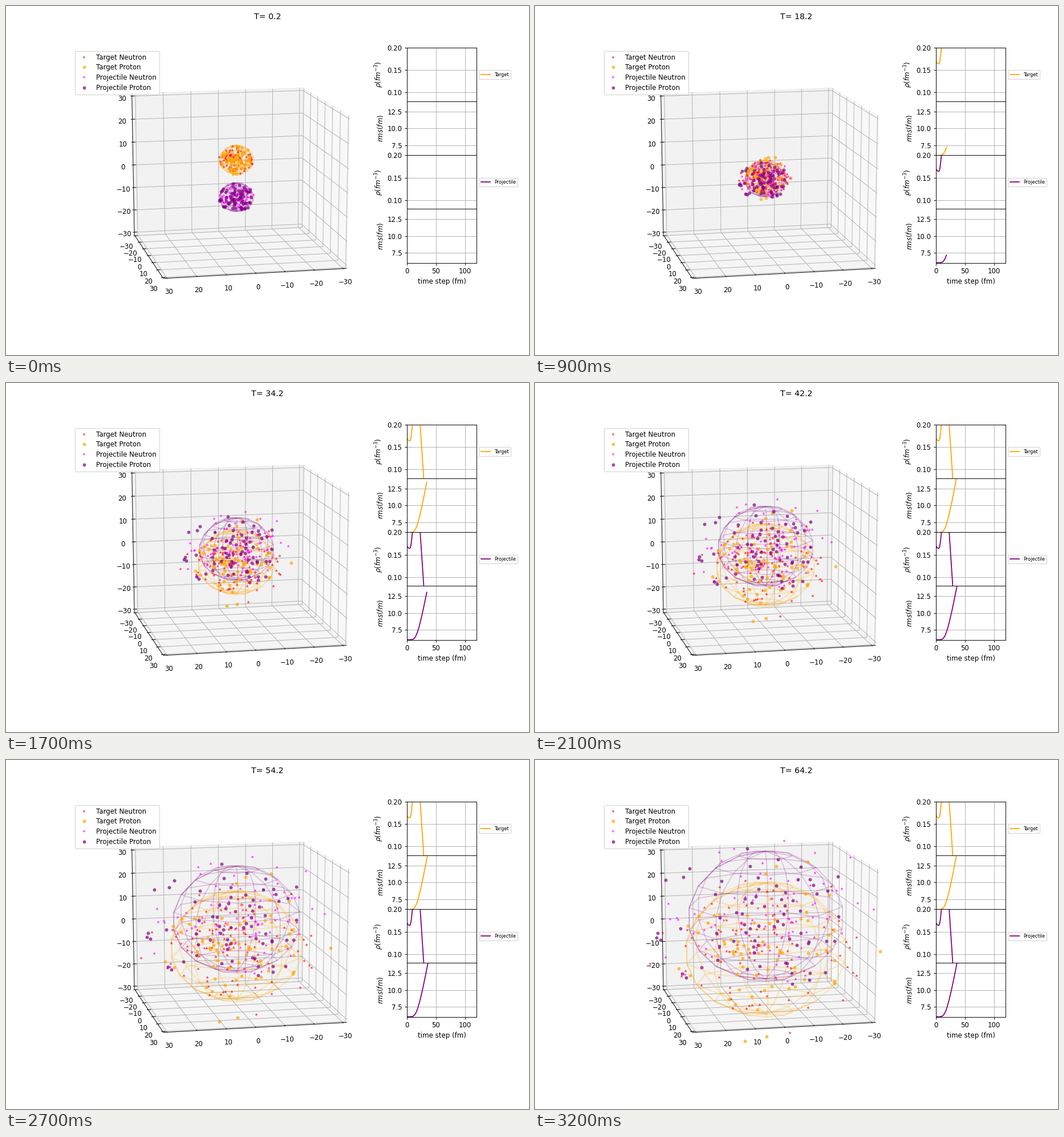
Write a matplotlib script that moves like this. It is 917 px wide and 611 px high and loops after 3300 ms.

```python
import numpy as np
import matplotlib.pyplot as plt
from matplotlib.animation import FuncAnimation
from matplotlib.collections import LineCollection, PolyCollection

W, H = 917, 611
H_FULL = 611.33  # layout height before rounding to whole pixels
FRAMES, STEP, T0 = 33, 2.0, 0.2
PT = 1.1793  # pixels per point

plt.rcParams.update({
    "font.family": "DejaVu Sans", "font.size": 10 * PT,
    "axes.linewidth": 0.8 * PT, "grid.linewidth": 0.8 * PT,
    "lines.linewidth": 1.5 * PT, "patch.linewidth": PT,
    "xtick.major.size": 3.5 * PT, "ytick.major.size": 3.5 * PT,
    "xtick.major.width": 0.8 * PT, "ytick.major.width": 0.8 * PT,
    "xtick.major.pad": 3.5 * PT, "ytick.major.pad": 3.5 * PT,
    "axes.labelpad": 4 * PT,
})

fig = plt.figure(figsize=(W / 72, H / 72), dpi=72, facecolor="white")
title = fig.suptitle("", y=0.98 * H_FULL / H, fontsize=12 * PT)


def add_axes(left, bottom, width, height):
    k = H_FULL / H
    return fig.add_axes([left, bottom * k, width, height * k])


# ---- perspective camera -------------------------------------------------
LEFT, RIGHT = 0.125 * W, 0.7396 * W
TOP, BOTTOM = H - 0.88 * H_FULL, H - 0.11 * H_FULL
SX, SY = (RIGHT - LEFT) / 0.185, (BOTTOM - TOP) / 0.185
CX, CY = LEFT + 0.095 * SX, BOTTOM - 0.095 * SY
AZ, EL = np.radians(78), np.radians(14)
EYE = np.array([np.cos(AZ) * np.cos(EL), np.sin(AZ) * np.cos(EL), np.sin(EL)])
U = np.array([-np.sin(AZ), np.cos(AZ), 0])
V = np.cross(EYE, U)


def project(p):
    p = np.asarray(p, float) / 60
    depth = 10 - p @ EYE
    return np.stack([CX + SX * (p @ U) / depth, CY - SY * (p @ V) / depth], -1)


ax = add_axes(0.125, 0.11, 0.6146, 0.77)
ax.set(xlim=(LEFT, RIGHT), ylim=(BOTTOM, TOP))
ax.axis("off")


def draw_box():
    e, pad = 31.25, 34.4
    panes = [
        ([(-e, -e, -e), (-e, e, -e), (-e, e, e), (-e, -e, e)], 0.95),
        ([(-e, -e, -e), (e, -e, -e), (e, -e, e), (-e, -e, e)], 0.90),
        ([(-e, -e, -e), (e, -e, -e), (e, e, -e), (-e, e, -e)], 0.925),
    ]
    for corners, grey in panes:
        shade = (grey, grey, grey, 0.5)
        ax.add_collection(PolyCollection([project(corners)], facecolor=shade,
                                         edgecolor=shade, zorder=0))
    grid, marks = [], []
    for k in range(-30, 31, 10):
        grid += [[(k, e, -e), (k, -e, -e), (k, -e, e)],
                 [(e, k, -e), (-e, k, -e), (-e, k, e)],
                 [(e, -e, k), (-e, -e, k), (-e, e, k)]]
        marks += [[(k, e + 0.5, -e), (k, e - 1, -e)],
                  [(e + 0.5, k, -e), (e - 1, k, -e)],
                  [(e + 0.5, -e, k), (e - 1, -e, k)]]
        for spot in [(k, pad, -pad), (pad, k, -pad), (pad, -pad, k)]:
            ax.text(*project(spot), str(k).replace("-", "\u2212"),
                    ha="center", va="top", zorder=4)
    marks += [[(e, e, -e), (-e, e, -e)], [(e, e, -e), (e, -e, -e)],
              [(e, -e, -e), (e, -e, e)]]
    for lines, color, z in [(grid, "#b0b0b0", 0.5), (marks, "black", 0.6)]:
        ax.add_collection(LineCollection([project(s) for s in lines], colors=color,
                                         linewidths=0.8 * PT, zorder=z))


draw_box()


# ---- motion laws --------------------------------------------------------
def drift(t):
    """Height of the rising nucleus: fast approach, then a slow steady drift."""
    return 0.141 * t - 1.95 - 6.05 * np.exp(-(t / 12.5) ** 1.4)


def rms(t, base, speed):
    """Radius: at rest until the collision, then linear growth."""
    grow = speed * 3 * np.log1p(np.exp((t - 10.5) / 3))
    return np.hypot(base, grow)


def density(t):
    rise = 0.164 + np.where(t < 5, 0.00025, 0.0018) * (t - 5) ** 2
    return np.minimum(rise, 0.136 - 0.0195 * (t - 26.2))


def smooth(t, start, end):
    w = np.clip((t - start) / (end - start), 0, 1)
    return w * w * (3 - 2 * w)


# ---- nuclei -------------------------------------------------------------
LON, LAT = np.meshgrid(np.linspace(0, 2 * np.pi, 10), np.linspace(0, np.pi, 10),
                       indexing="ij")
BALL = np.stack([np.cos(LON) * np.sin(LAT), np.sin(LON) * np.sin(LAT), np.cos(LAT)], -1)


def cloud(count, rng):
    """Late offsets in units of the radius, and their packed early form."""
    late = rng.normal(0, (0.6, 0.6, 0.5), (count, 3))
    r = np.linalg.norm(late, axis=1, keepdims=True)
    late *= np.minimum(1, 1.45 / r)
    return late, late / (1 + (r / 1.05) ** 6) ** (1 / 6)


class Nucleus:
    def __init__(self, name, sign, base, speed, n_color, p_color, wire_width, rng):
        self.sign, self.base, self.speed = sign, base, speed
        self.wire = LineCollection([], colors=p_color, alpha=0.2,
                                   linewidths=wire_width * PT, zorder=1)
        ax.add_collection(self.wire)
        self.groups = []
        for kind, count, color, marker, size in [("Neutron", 90, n_color, "*", 5.6),
                                                 ("Proton", 70, p_color, "o", 5.9)]:
            dots, = ax.plot([], [], marker, color=color, ms=size, mew=0, alpha=0.7,
                            zorder=2, label=f"{name} {kind}")
            self.groups.append((dots, *cloud(count, rng)))

    def radius(self, t):
        return rms(t, self.base, self.speed)

    def update(self, t):
        mid, rad = np.array([0, 0, self.sign * drift(t)]), self.radius(t)
        mesh = project(mid + rad * BALL)
        self.wire.set_segments(list(mesh) + list(mesh.swapaxes(0, 1)))
        w = smooth(t, 8, 24)
        for dots, late, early in self.groups:
            dots.set_data(*project(mid + rad * (early + w * (late - early))).T)


rng = np.random.default_rng(12)
target = Nucleus("Target", -1, 5.95, 0.51, "red", "orange", 2, rng)
projectile = Nucleus("Projectile", 1, 6.0, 0.49, "magenta", "purple", 1.5, rng)
ax.legend(loc="upper left", labelspacing=0.4)


# ---- side charts --------------------------------------------------------
def add_chart(row, label, ylim, ticks, color, name=None):
    chart = add_axes(0.7664, 0.726 - 0.154 * row, 0.1336, 0.154)
    chart.set(xlim=(0, 120), ylim=ylim, xticks=[0, 50, 100], yticks=ticks, ylabel=label)
    chart.grid(True)
    if row < 3:
        chart.tick_params(labelbottom=False)
    else:
        chart.set_xlabel("time step (fm)")
    line, = chart.plot([], [], color=color, label=name)
    if name:
        chart.legend(loc="center left", bbox_to_anchor=(1, 0.5), fontsize=7 * PT)
    return line


curves = []
for i, (nuc, name, color) in enumerate([(target, "Target", "orange"),
                                        (projectile, "Projectile", "purple")]):
    curves.append((add_chart(2 * i, r"$\rho(fm^{-3})$", (0.08, 0.20),
                             [0.10, 0.15, 0.20], color, name), density))
    curves.append((add_chart(2 * i + 1, "$rms(fm)$", (6, 14),
                             [7.5, 10, 12.5], color), nuc.radius))


def update(frame):
    t = T0 + STEP * frame
    title.set_text(f"T= {t:.1f}")
    target.update(t)
    projectile.update(t)
    past = np.linspace(T0, t, 200)
    for line, law in curves:
        line.set_data(past, law(past))
    return []


anim = FuncAnimation(fig, update, frames=FRAMES, interval=100, repeat=True,
                     repeat_delay=0, blit=False)
plt.show()
```
